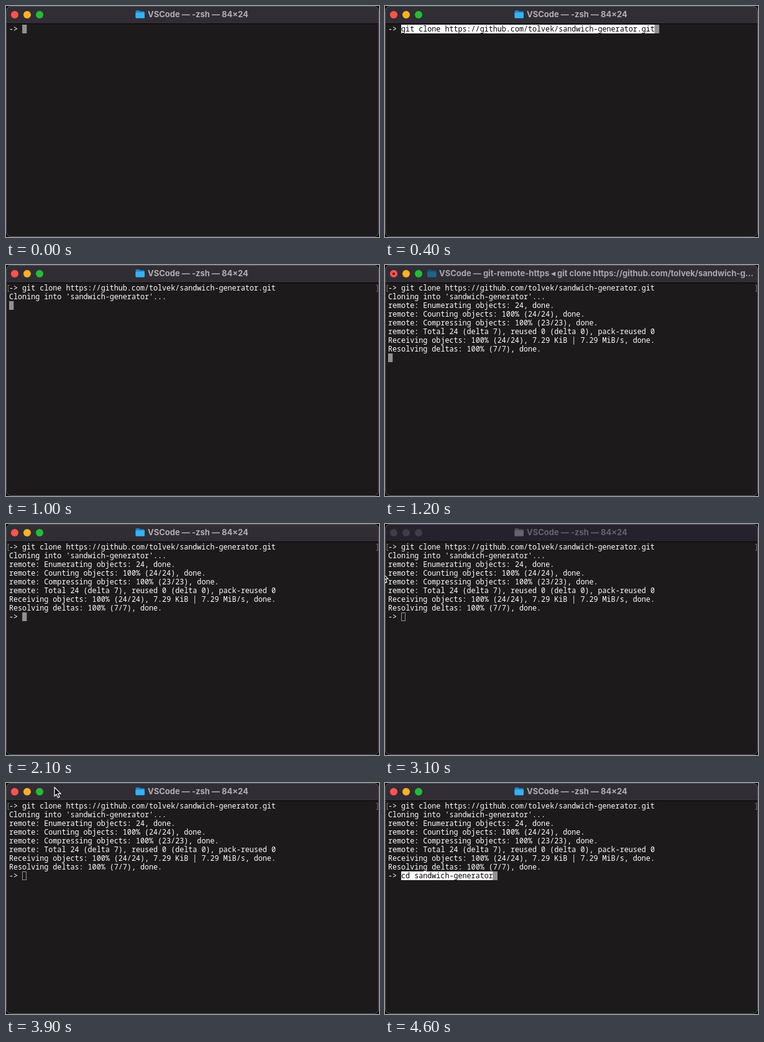
These frames come from a looping animation (600x371 px, 5 s). An HTML page with a canvas:

```html
<!DOCTYPE html>
<html>
<head>
<meta charset="utf-8">
<style>
  html, body { margin: 0; width: 100%; height: 100%; overflow: hidden; background: #0b0a0c; }
  canvas { display: block; }
</style>
</head>
<body>
<canvas id="stage" width="600" height="371"></canvas>
<script>
const ctx = document.getElementById('stage').getContext('2d');
const LOOP = 5000, STEP = 100;
const CHAR = 7.03, ROW = 14, LEFT = 5, TOP = 30;
const MONO = '500 11.72px "Noto Sans Mono", monospace';
const SANS = 'bold 13px Inter, sans-serif';
const REPO = 'sandwich-generator';
const CLONE = `git clone https://github.com/tolvek/${REPO}.git`;
const CD = `cd ${REPO}`;
const OUTPUT = [
  `Cloning into '${REPO}'...`,
  'remote: Enumerating objects: 24, done.',
  'remote: Counting objects: 100% (24/24), done.',
  'remote: Compressing objects: 100% (23/23), done.',
  'remote: Total 24 (delta 7), reused 0 (delta 0), pack-reused 0',
  'Receiving objects: 100% (24/24), 7.29 KiB | 7.29 MiB/s, done.',
  'Resolving deltas: 100% (7/7), done.'
];
const IDLE_TITLE = 'VSCode — -zsh — 84×24';
const BUSY_TITLE = `VSCode — git-remote-https ◂ ${CLONE.slice(0, 46)}...`;

// pointer tip: [time, x, y]
const ENTER = [[3100, -5, 78], [3200, 9, 46]];
const CLICK = [[3600, 4, 40], [3900, 78, 7], [4200, 80, 5]];

const clamp = v => Math.max(0, Math.min(1, v));
const mix = (a, b, p) => `rgb(${a.map((v, i) => Math.round(v + (b[i] - v) * p))})`;

function rect(x, y, w, h, color) {
  ctx.fillStyle = color;
  ctx.fillRect(x, y, w, h);
}

function text(str, x, y, color, font = MONO) {
  ctx.font = font;
  ctx.fillStyle = color;
  ctx.fillText(str, x, y);
}

function line(str, row, col = 0, color = '#fff') {
  text(str, LEFT + col * CHAR, TOP + row * ROW + 11, color);
}

function caret(row, col, hollow) {
  const x = LEFT + col * CHAR, y = TOP + row * ROW;
  if (!hollow) return rect(x, y, CHAR + .3, ROW, '#918f91');
  ctx.strokeStyle = '#918f91';
  ctx.strokeRect(Math.round(x) + .5, y + .5, 6, ROW - 1);
}

function pasted(str, row) {
  rect(LEFT + 3 * CHAR, TOP + row * ROW, str.length * CHAR, ROW, '#fff');
  line(str, row, 3, '#000');
  caret(row, 3 + str.length);
}

function folder(x, back, front) {
  ctx.fillStyle = back;
  ctx.beginPath();
  ctx.roundRect(x, 7, 7, 5, 1.5);
  ctx.roundRect(x, 8.5, 14.5, 11, 1.5);
  ctx.fill();
  ctx.fillStyle = front;
  ctx.beginPath();
  ctx.roundRect(x, 10.5, 14.5, 9, 1.5);
  ctx.fill();
}

function titleBar(dim, busy) {
  rect(0, 0, 600, 28, mix([49, 45, 53], [37, 33, 45], dim));
  rect(0, 28, 600, 1, '#050506');
  [[255, 84, 79], [255, 178, 36], [33, 190, 53]].forEach((color, i) => {
    ctx.fillStyle = mix(color, [65, 61, 70], dim);
    ctx.beginPath();
    ctx.arc(14 + i * 20, 14, 6, 0, 7);
    ctx.fill();
  });
  if (busy) {
    ctx.fillStyle = '#6b0d0a';
    ctx.beginPath();
    ctx.arc(14, 14, 2, 0, 7);
    ctx.fill();
    folder(68, '#174e70', '#20638a');
    text(BUSY_TITLE, 87, 18, '#aaa7ad', SANS);
  } else {
    folder(208.5, mix([23, 137, 205], [82, 80, 85], dim), mix([54, 178, 240], [102, 100, 105], dim));
    text(IDLE_TITLE, 228, 18, mix([176, 173, 179], [103, 99, 107], dim), SANS);
  }
}

function pointer(path, t) {
  const last = path.length - 1;
  if (t < path[0][0] || t > path[last][0]) return;
  const i = Math.min(path.findLastIndex(p => p[0] <= t), last - 1);
  const [t0, x0, y0] = path[i], [t1, x1, y1] = path[i + 1];
  const p = (t - t0) / (t1 - t0);
  ctx.save();
  ctx.translate(x0 + (x1 - x0) * p, y0 + (y1 - y0) * p);
  const arrow = new Path2D('M0 0V14L3.2 11L5.6 16.5L8 15.4L5.7 10.2H10Z');
  ctx.fillStyle = '#000';
  ctx.fill(arrow);
  ctx.strokeStyle = '#fff';
  ctx.lineWidth = 1.2;
  ctx.stroke(arrow);
  ctx.restore();
}

function terminal(t) {
  line('->', 0);
  if (t < 400) return caret(0, 3);
  if (t < 1000) return pasted(CLONE, 0);

  line(CLONE, 0, 3);
  text('[', 0, 41, '#777');
  text(']', 594, 41, '#777');
  const shown = t < 1100 ? 1 : t < 1200 ? 4 : OUTPUT.length;
  OUTPUT.slice(0, shown).forEach((str, i) => line(str, i + 1));
  if (t < 1300) return caret(shown + 1, 0);

  line('->', 8);
  if (t >= 4600) pasted(CD, 8);
  else caret(8, 3, t >= 2200 && t < 4000);
}

function draw(t) {
  ctx.clearRect(0, 0, 600, 371);
  ctx.save();
  ctx.beginPath();
  ctx.roundRect(0, 0, 600, 371, 8);
  ctx.clip();
  rect(0, 0, 600, 371, '#1c1a1b');
  const dim = clamp((t - 2100) / 300) - clamp((t - 3600) / 300);
  titleBar(dim, t >= 1100 && t < 1300);
  terminal(t);
  ctx.restore();
  ctx.lineWidth = 1;
  ctx.strokeStyle = '#59575b';
  ctx.beginPath();
  ctx.roundRect(.5, .5, 599, 370, 8);
  ctx.stroke();
  pointer(ENTER, t);
  pointer(CLICK, t);
}

function tick() {
  const t = performance.now() % LOOP;
  draw(Math.floor(t / STEP) * STEP);
  requestAnimationFrame(tick);
}
tick();
</script>
</body>
</html>
```
